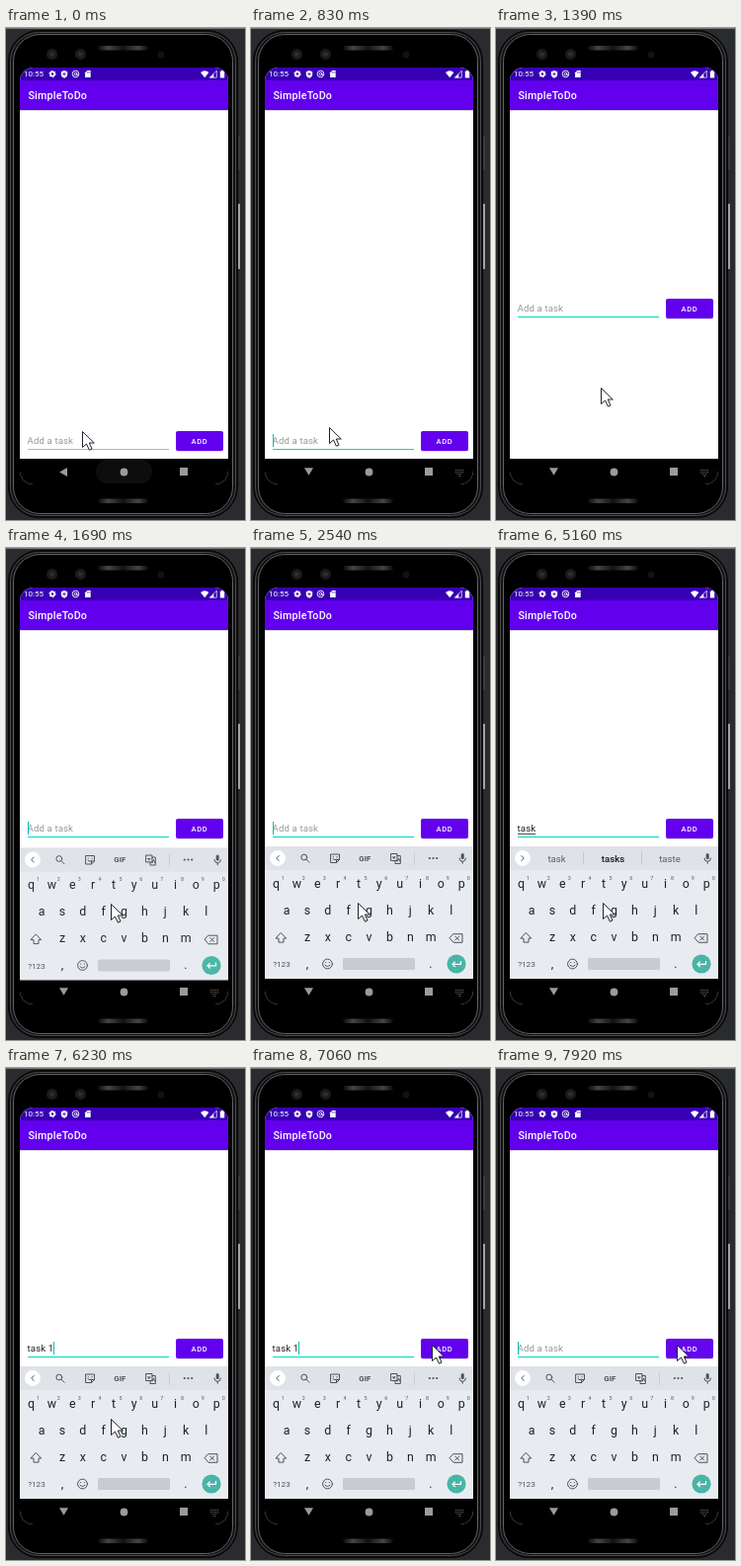
Write an HTML page that moves like this. It is 242x498 px and loops after 8 s.

```html
<!DOCTYPE html>
<html lang="en">
<head>
<meta charset="utf-8">
<title>To-do app</title>
<style>
  html, body { margin: 0; width: 100%; height: 100%; overflow: hidden; background: #2a2b2f; }
  svg { display: block; width: 242px; height: 498px; }
  text { font-family: Roboto, "Noto Sans", sans-serif; white-space: pre; }
  .mid { text-anchor: middle; }
  .medium { font-weight: 500; }
  .line { fill: none; stroke: #4b5358; stroke-width: 1; stroke-linejoin: round; stroke-linecap: round; }
  .keys { font-size: 12.4px; fill: #18232a; }
  .digits { font-size: 5.4px; fill: #555d61; }
  .words { font-size: 9.6px; fill: #566066; }
</style>
</head>
<body>
<svg viewBox="0 0 242 498">
  <defs>
    <clipPath id="screen"><rect x="14" y="40" width="211" height="422" rx="14"/></clipPath>
    <linearGradient id="grille">
      <stop offset="0" stop-color="#0a0a0a"/>
      <stop offset=".2" stop-color="#454545"/>
      <stop offset=".5" stop-color="#121212"/>
      <stop offset=".8" stop-color="#454545"/>
      <stop offset="1" stop-color="#0a0a0a"/>
    </linearGradient>
    <g id="lens">
      <circle r="5.500" fill="#1a1b1c"/>
      <circle r="2.500" fill="#2b2d30"/>
    </g>
  </defs>

  <!-- phone body -->
  <rect width="242" height="498" fill="#2a2b2f"/>
  <rect width="242" height="1" fill="#77787a"/>
  <rect x="235" y="110" width="2" height="33" fill="#3a3b3e"/>
  <rect x="235" y="178" width="2" height="66" fill="#a2a3a5"/>
  <rect x="2.500" y="2.500" width="232" height="493" rx="31" fill="#111112" stroke="#050505"/>
  <rect x="4.500" y="4.500" width="228" height="489" rx="29" fill="none" stroke="#4a4a4c"/>
  <rect x="7.500" y="6.500" width="222" height="485" rx="27" fill="#000" stroke="#626264"/>
  <rect x="93" y="18" width="51" height="4.500" rx="2.250" fill="url(#grille)"/>
  <rect x="93" y="476.500" width="51" height="4.500" rx="2.250" fill="url(#grille)"/>
  <use href="#lens" x="46.500" y="26.500"/>
  <use href="#lens" x="75.500" y="26.500"/>
  <circle cx="157" cy="27" r="3.500" fill="#121213"/>

  <g clip-path="url(#screen)">
    <rect x="14" y="40" width="211" height="422" fill="#fff"/>
    <rect x="14" y="40" width="211" height="13" fill="#3700b3"/>
    <rect x="14" y="53" width="211" height="30" fill="#6200ee"/>
    <rect x="14" y="83" width="211" height="1" fill="#000" opacity=".15"/>
    <text class="medium" x="22.400" y="72.400" font-size="10.74" letter-spacing=".2" fill="#fff">SimpleToDo</text>

    <!-- status bar -->
    <g fill="#fff">
      <text x="18" y="49.300" font-size="8">10:55</text>
      <circle cx="47" cy="46.500" r="2.100" fill="none" stroke="#fff" stroke-width="1.7"/>
      <circle cx="47" cy="46.500" r="3.200" fill="none" stroke="#fff" stroke-width="1" stroke-dasharray="1.5 1.85"/>
      <path d="M59 43l3.200 1.200v2.500q0 2.800-3.200 4.100q-3.200-1.300-3.200-4.100v-2.500z"/>
      <path d="M59 44.800v3.600m-1.600-1.800h3.200" stroke="#3700b3" stroke-width=".8"/>
      <g fill="none" stroke="#fff" stroke-width=".9">
        <circle cx="70.500" cy="46.500" r="3.300"/>
        <circle cx="70.500" cy="46.500" r="1.300"/>
        <path d="M71.800 45.700v1.500q.8 1 1.800 0"/>
      </g>
      <path d="M82.300 43h3.400v7h-5.600v-4.800z"/>
      <path d="M82.500 44v1.700m1.200-1.700v1.700m1.200-1.700v1.700" stroke="#3700b3" stroke-width=".5"/>
      <path d="M197 45q4.200-3.400 8.400 0l-4.200 5.300z"/>
      <path d="M210.300 46.300v3.900h-3.900z"/>
      <path d="M213.300 43.200v7h-7z" fill="none" stroke="#fff" stroke-width=".7"/>
      <path d="M218 43h2v.8h1.200v6.700h-4.400v-6.700h1.200z"/>
    </g>

    <!-- input row -->
    <g id="row">
      <text id="entry" x="21.600" y="287.400" font-size="9.66" letter-spacing=".1"></text>
      <rect id="compose" x="22" y="289" height=".8" fill="#222"/>
      <rect id="caret" y="277" width="1" height="13" fill="#03bfae"/>
      <rect id="rule" x="22" width="143"/>
      <rect x="172" y="275" width="48" height="20" rx="2" fill="#000" opacity=".12"/>
      <rect id="button" x="172" y="274" width="48" height="20" rx="2"/>
      <text class="medium" x="187.400" y="286.800" font-size="7.600" letter-spacing=".7" fill="#fff">ADD</text>
    </g>

    <rect x="14" y="436" width="211" height="27" fill="#000"/>

    <!-- keyboard -->
    <g id="keyboard">
      <rect x="14" y="302" width="211" height="134" fill="#e8ecf0"/>
      <rect x="14" y="302" width="211" height="24" fill="#dfe3e7"/>
      <circle cx="27" cy="314" r="7.900" fill="#fff"/>
      <path id="chevron" class="line"/>
      <g id="tools">
        <g class="line">
          <circle cx="53.800" cy="313" r="2.900"/>
          <path d="M56 315.200l3 3"/>
          <path d="M81 310h8.500v5.500l-3 3h-5.500zM89.500 315.500h-3v3M83.300 312.500v.3m3.700-.3v.3M83 314.800q2 2 3.600.3"/>
          <rect x="142" y="309.500" width="6" height="7"/>
          <path d="M148 311.500h3.300v8h-5.300v-3M143.500 313h2.600m-1.300 0v1.500m3.400 2.500l1.300-3l1.300 3"/>
        </g>
        <text class="mid" x="115.300" y="316.800" font-size="7.800" font-weight="700" fill="#4b5358">GIF</text>
        <path d="M165.500 308v13" stroke="#c5cacd" stroke-width=".8"/>
        <g fill="#4b5358">
          <circle cx="180.800" cy="314" r="1.100"/>
          <circle cx="184.500" cy="314" r="1.100"/>
          <circle cx="188.200" cy="314" r="1.100"/>
        </g>
      </g>
      <g id="words" class="words mid">
        <path d="M88.500 308v12.500M147.500 308v12.500" stroke="#bcc2c6" stroke-width=".8"/>
        <text x="61.500" y="317.500"></text>
        <text x="118.500" y="317.500" font-weight="500" fill="#151c20"></text>
        <text x="176" y="317.500"></text>
      </g>
      <rect x="212.700" y="309" width="3" height="6" rx="1.500" fill="#4b5358"/>
      <path class="line" d="M211 314q0 3.300 3.200 3.300t3.200-3.300M214.200 317.300v2"/>
      <g id="keys" class="keys mid"></g>
      <g id="digits" class="digits mid"></g>
      <path class="line" d="M30.500 389.700l5.200 5.400h-2.700v4h-5v-4h-2.700z"/>
      <path class="line" d="M205 390.700h9v8.600h-9l-3.700-4.300zM206.700 393l4 4m0-4l-4 4"/>
      <text class="mid" x="31" y="424" font-size="8.100" fill="#4b5358">?123</text>
      <g class="line">
        <circle cx="77.500" cy="421" r="4.900"/>
        <path d="M75.700 419.400v.3m3.600-.3v.3M75 422.200q2.500 2.800 5 0"/>
      </g>
      <rect x="93" y="415" width="73" height="12" rx="1.500" fill="#c8ccd0"/>
      <circle cx="208" cy="421" r="9.600" fill="#48b5a6"/>
      <path d="M212.500 418v3.300h-8.500m2.700-2.700l-2.700 2.700l2.700 2.700" fill="none" stroke="#fff" stroke-width="1.200"/>
    </g>

    <!-- navigation bar -->
    <rect id="homeGlow" x="91" y="437" width="57" height="24" rx="12" fill="#0d0d0d"/>
    <g fill="#9b9b9b">
      <path id="back"/>
      <circle cx="119.500" cy="449.500" r="3.900"/>
      <rect x="176" y="445" width="8" height="8"/>
      <g id="imeIcon">
        <path d="M207 447.500h8.500m-8.500 2h8.500m-7 2h5.500" stroke="#858585" stroke-width=".9" stroke-dasharray=".9 .9"/>
        <path d="M210 453h2.500l-1.250 1.200z" fill="#777"/>
      </g>
    </g>
  </g>

  <path id="mouse" d="M0 0V16L4 12.500L6.900 18.700L9.500 17.500L6.800 11.500H11.800Z" fill="#fff" stroke="#20202a" stroke-linejoin="round"/>
</svg>

<script>
const LOOP = 8000;
const $ = id => document.getElementById(id);
const set = (id, attrs) => {
  for (const name in attrs) $(id).setAttribute(name, attrs[name]);
};
const show = (id, on) => set(id, { visibility: on ? 'inherit' : 'hidden' });

// Every track is a list of [start time, ...values]; the latest entry holds.
const at = (track, t) => track.filter(step => step[0] <= t).pop();

const mouse = [
  [0, 77.500, 408.500], [120, 77.500, 406.500], [260, 78.500, 404.500], [400, 78.500, 405.500],
  [830, 79.500, 404.500], [970, 86.500, 394.500], [1110, 95.500, 381.500], [1250, 103.500, 370.500],
  [1390, 106.500, 364.500], [1540, 106.500, 362.500], [1690, 106.500, 360.500], [1840, 108.500, 359.500],
  [6230, 106.500, 355.500], [6370, 116.500, 339.500], [6510, 138.500, 312.500], [6650, 163.500, 286.500],
  [6790, 179.500, 272.500], [6920, 182.500, 277.500], [7060, 183.500, 280.500]
];
const typing = [
  [0, '', 22], [4120, 't', 25], [4270, 'ta', 30], [4570, 'tas', 35],
  [4720, 'task', 40], [5460, 'task ', 43], [5780, 'task 1', 48], [7920, '', 22]
];
const suggestions = [
  [0], [4120, 't', 'thanks', 'thank'], [4270, 'ta', 'take', 'talk'],
  [4570, 'tas', 'task', 'taste'], [4720, 'task', 'tasks', 'taste'],
  [5460, 'is', 'for', 'and'], [5780]
];
const blink = [
  [0, 0], [540, 1], [1110, 0], [1540, 1], [2110, 0], [2540, 1], [2980, 0],
  [3420, 1], [5160, 0], [5460, 1], [6370, 0], [6790, 1], [7350, 0], [7790, 1]
];
const slide = [[0, 0, 0], [1540, 16, .6], [1690, 1.500, .97], [1840, 0, 1]];
const ruleColour = [[0, '#929292'], [260, '#77aaa5'], [400, '#31cbbb'], [540, '#03dac5']];
const buttonColour = [[0, '#6200ee'], [7790, '#7f34f1'], [7920, '#6506ee']];

function addLabel(parent, label, x, y) {
  const text = document.createElementNS('http://www.w3.org/2000/svg', 'text');
  text.textContent = label;
  text.setAttribute('x', x);
  text.setAttribute('y', y);
  $(parent).append(text);
}

const PITCH = 20.860;
[['qwertyuiop', 25.500, 343.500], ['asdfghjkl', 36, 370.500], ['zxcvbnm', 57, 397.700]]
  .forEach(([letters, x, y]) =>
    [...letters].forEach((letter, i) => addLabel('keys', letter, x + i * PITCH, y)));
[...'1234567890'].forEach((digit, i) => addLabel('digits', digit, 32.500 + i * PITCH, 335.500));
addLabel('keys', ',', 57, 424.500);
addLabel('keys', '.', 182, 424.500);
const words = $('words').querySelectorAll('text');

function draw(t) {
  const [, mx, my] = at(mouse, t);
  set('mouse', { transform: `translate(${mx} ${my})` });

  const [, typed, caretX] = at(typing, t);
  const raised = t >= 1110;
  const focused = t >= 260;
  set('row', { transform: `translate(0 ${raised ? 0 : 134})` });
  $('entry').textContent = typed || 'Add a task';
  set('entry', { fill: typed ? '#222' : '#999' });
  set('caret', { x: caretX });
  show('caret', at(blink, t)[1]);
  show('compose', t >= 4120 && t < 5460);
  set('compose', { width: caretX - 22 });
  set('rule', { y: 292, height: focused ? 1.100 : .7, fill: at(ruleColour, t)[1] });
  set('button', { fill: at(buttonColour, t)[1] });

  const [, drop, alpha] = at(slide, t);
  set('keyboard', { transform: `translate(0 ${drop})`, opacity: alpha });
  const [, ...choices] = at(suggestions, t);
  const suggesting = choices.length > 0;
  words.forEach((word, i) => { word.textContent = choices[i] || ''; });
  show('words', suggesting);
  show('tools', !suggesting);
  set('tools', { opacity: t >= 5780 && t < 5930 ? .5 : 1 });
  set('chevron', { d: suggesting ? 'M25.800 311.500l2.500 2.500l-2.500 2.500' : 'M28.200 311.500l-2.500 2.500l2.500 2.500' });

  const imeOpen = t >= 830;
  set('back', { d: imeOpen ? 'M54 445.300h9l-4.500 7.500z' : 'M62 445v9l-7.800-4.500z' });
  show('imeIcon', imeOpen);
  show('homeGlow', !imeOpen);
}

const start = performance.now();
function tick() {
  draw((performance.now() - start) % LOOP);
  requestAnimationFrame(tick);
}
tick();
</script>
</body>
</html>
```
